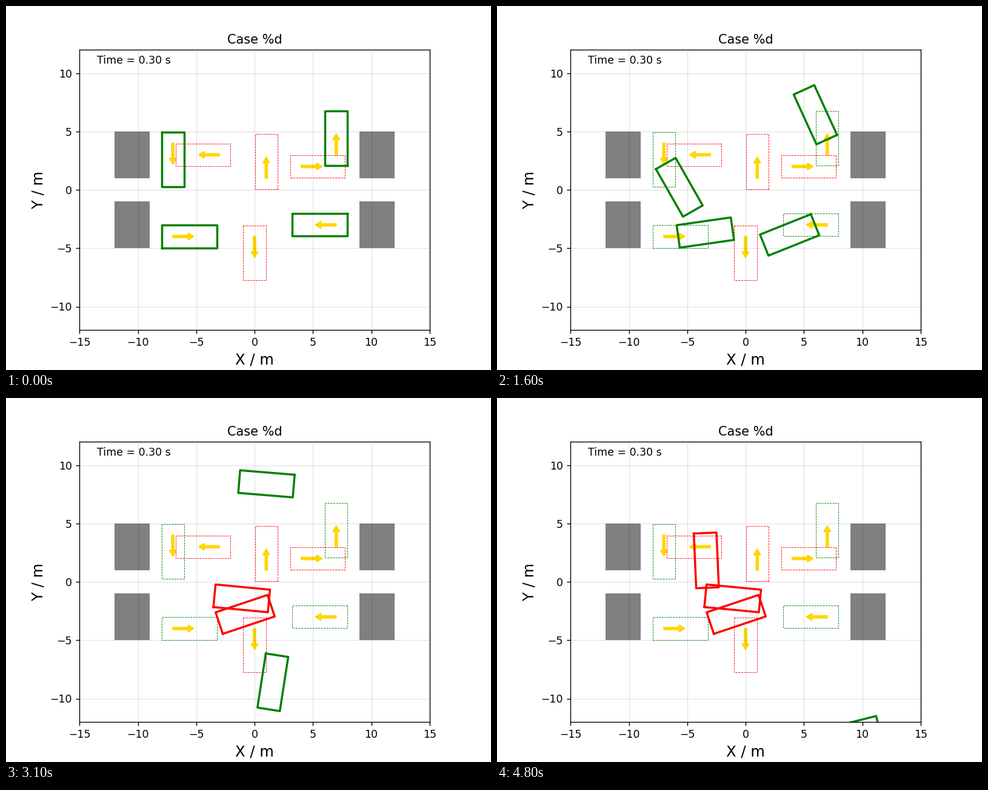
A matplotlib script for the animation above (4900 ms loop, 800 by 600 pixels).

```python
import numpy as np
import matplotlib.pyplot as plt
from matplotlib.animation import FuncAnimation
from matplotlib.patches import Rectangle

STEPS = 49
WHEELBASE, FRONT, REAR, WIDTH = 2.8, 0.96, 0.929, 1.942

# x, y, heading in degrees
PARKED = [(1, 1, 90), (-3, 3, 180), (4, 2, 0), (0, -4, -90)]

# start pose, steering angle, first step length, step growth, crash step
MOVING = [
    ((-7, 4, -90), 0.5, 0.0355, 0.01738, 28),
    ((-7, -4, 0), 0.1815, 0.083, 0.0069, 28),
    ((7, -3, 180), 0.5, 0.0093, 0.0150, None),
    ((7, 3, 90), 0.5, 0.0287, 0.0145, 46),
]


def outline(x, y, a):
    """Closed outline of a car whose rear axle is at (x, y)."""
    nose, half = WHEELBASE + FRONT, WIDTH / 2
    u = np.array([-REAR, nose, nose, -REAR, -REAR])
    v = np.array([-half, -half, half, half, -half])
    return (x + u * np.cos(a) - v * np.sin(a),
            y + u * np.sin(a) + v * np.cos(a))


def drive(start, steer, step, growth, crash):
    """Euler steps of the bicycle model; a crashed car stays put."""
    x, y, a = start[0], start[1], np.radians(start[2])
    path = [(x, y, a)]
    for k in range(1, STEPS):
        if crash is None or k <= crash:
            x += step * np.cos(a)
            y += step * np.sin(a)
            a += step * np.tan(steer) / WHEELBASE
            step += growth
        path.append((x, y, a))
    return path


def draw_start(ax, pose, color):
    x, y, a = pose[0], pose[1], np.radians(pose[2])
    ax.plot(*outline(x, y, a), color=color, ls='--', lw=0.5)
    ax.arrow(x, y, 1.3 * np.cos(a), 1.3 * np.sin(a), width=0.2,
             head_width=0.6, head_length=0.5, color='gold')


plt.rcParams['font.family'] = 'DejaVu Sans'
fig, ax = plt.subplots(figsize=(6.4, 4.8), dpi=125)
ax.set_aspect('equal')
ax.set(xlim=(-15, 15), ylim=(-12, 12))
ax.set_xticks(range(-15, 16, 5))
ax.set_yticks(range(-10, 11, 5))
ax.grid(color='black', alpha=0.1, lw=0.8)
ax.set_title('Case %d', fontsize=12)
ax.set_xlabel('X / m', fontsize=14)
ax.set_ylabel('Y / m', fontsize=14)
ax.text(0.05, 0.95, 'Time = 0.30 s', transform=ax.transAxes, fontsize=10)

for x in (-12, 9):
    for y in (-5, 1):
        ax.add_patch(Rectangle((x, y), 3, 4, fc='gray', ec='none'))
for pose in PARKED:
    draw_start(ax, pose, 'red')
for car in MOVING:
    draw_start(ax, car[0], 'green')

paths = [drive(*car) for car in MOVING]
lines = [ax.plot([], [], lw=2)[0] for _ in MOVING]


def update(k):
    for line, path, car in zip(lines, paths, MOVING):
        crash = car[-1]
        line.set_data(*outline(*path[k]))
        line.set_color('red' if crash is not None and k >= crash else 'green')
    return lines


anim = FuncAnimation(fig, update, frames=STEPS, interval=100,
                     repeat=True, repeat_delay=0, blit=False)
plt.show()
```
